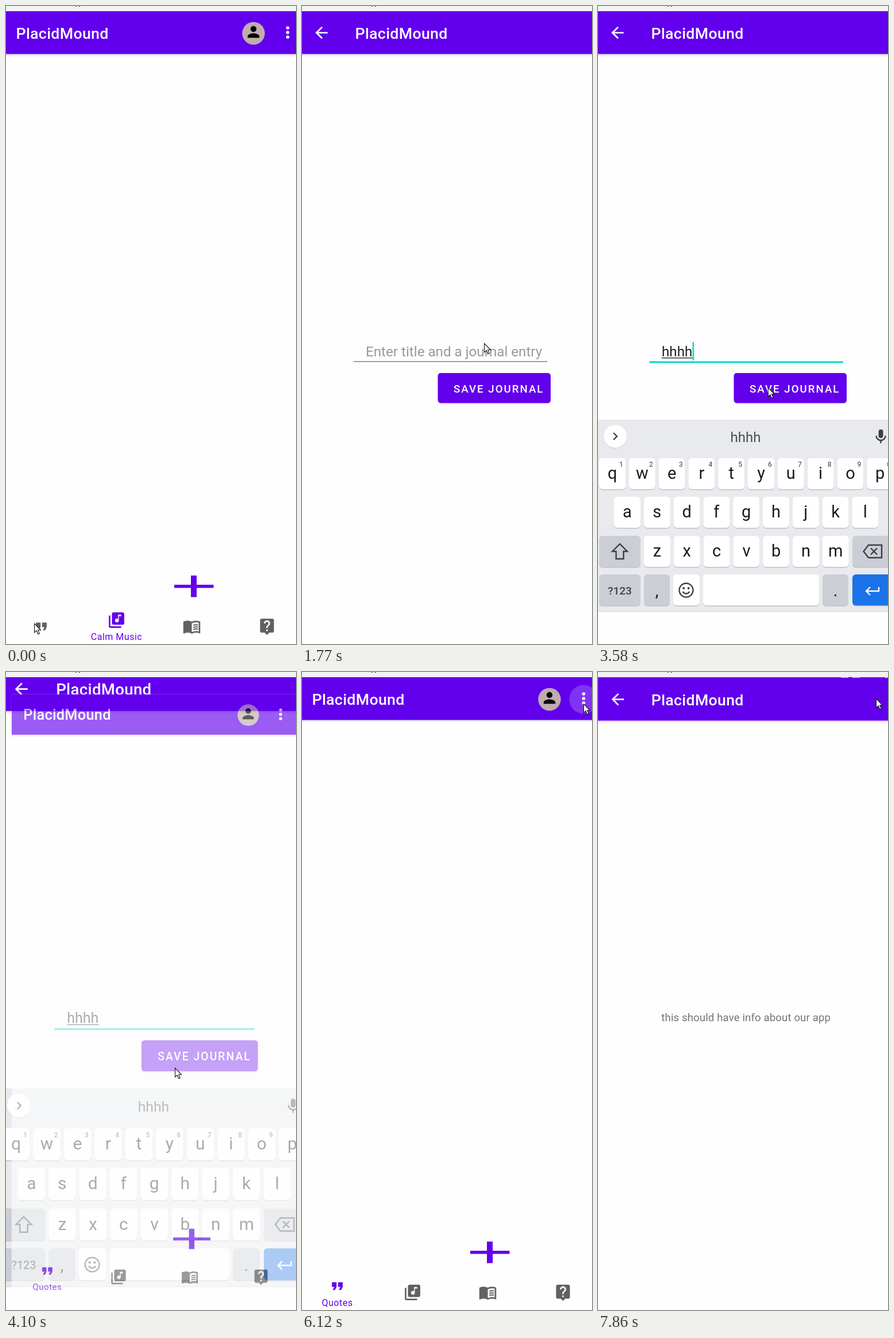
Recreate the animation shown at these times as an HTML page. Size 505 by 1109 pixels, loop 8 s.

```html
<!DOCTYPE html>
<html lang="en">
<head>
<meta charset="utf-8">
<title>Journal app</title>
<style>
  html, body { margin: 0; width: 100%; height: 100%; overflow: hidden; background: #fefefe; }
  svg { display: block; width: 505px; height: 1109px; font-family: Roboto, sans-serif; }
  .title { font-size: 26.7px; font-weight: 500; letter-spacing: .33px; fill: #fff; }
  .label { font-size: 16px; letter-spacing: .5px; text-anchor: middle; }
  .field { font-size: 24.2px; }
  .save { font-size: 18.7px; font-weight: 500; letter-spacing: 2px; fill: #fff; }
  .info { font-size: 18.7px; letter-spacing: .1px; fill: #757575; }
  .item { font-size: 21.3px; fill: #212121; }
  .key { font-size: 29px; text-anchor: middle; fill: #1b1b1d; }
  .digit { font-size: 12px; font-weight: 500; text-anchor: middle; fill: #5f6368; }
  .mode { font-size: 19px; font-weight: 500; text-anchor: middle; fill: #3c4043; }
  .hint { font-size: 24px; text-anchor: middle; fill: #4a4d51; }
  .line { fill: none; stroke: #3c4043; stroke-width: 2.4; }
</style>
</head>
<body>
<svg id="svg" viewBox="0 0 505 1109">
  <defs><clipPath id="phone"><rect y="9" width="505" height="1100"/></clipPath></defs>
  <rect width="505" height="1109" fill="#fefefe"/>
  <rect width="505" height="9" fill="#f4f2f5"/>
  <path d="M121 0h2M127 0h2" stroke="#222" stroke-width="2"/>
  <g clip-path="url(#phone)"><g id="stage">
    <g id="home"></g><g id="journal"></g><g id="about"></g>
  </g></g>
  <path id="cursor" d="M.5 .5V16l3.6-3.3 2.6 6 2.6-1.1-2.6-5.8h4.8z" fill="#fff" stroke="#111" stroke-width="1.1"/>
</svg>
<script>
const $ = id => document.getElementById(id);
const PURPLE = '#6200ee', TEAL = '#03dac5', APP = 'PlacidMound';

const text = (cls, x, y, s, more = '') => `<text class="${cls}" x="${x}" y="${y}" ${more}>${s}</text>`;
const rect = (x, y, w, h, fill, r = 0) =>
  `<rect x="${x}" y="${y}" width="${w}" height="${h}" rx="${r}" fill="${fill}"/>`;
// 24-unit icon centred on x, y
const icon = (d, x, y, fill, k = 1.34) =>
  `<path d="${d}" fill="${fill}" transform="translate(${x} ${y}) scale(${k}) translate(-12 -12)"/>`;

const ICONS = {
  quote: 'M6 17h3l2-4V7H5v6h3zm8 0h3l2-4V7h-6v6h3z',
  music: 'M20 2H8c-1.1 0-2 .9-2 2v12c0 1.1.9 2 2 2h12c1.1 0 2-.9 2-2V4c0-1.1-.9-2-2-2zm-2 5h-3v5.5c0 1.38-1.12 2.5-2.5 2.5S10 13.88 10 12.5s1.12-2.5 2.5-2.5c.57 0 1.08.19 1.5.51V5h4zM4 6H2v14c0 1.1.9 2 2 2h14v-2H4z',
  book: 'M21 5c-1.1-.35-2.3-.5-3.5-.5-1.95 0-4.05.4-5.5 1.5-1.45-1.1-3.55-1.5-5.5-1.5S2.45 4.9 1 6v14.65c0 .3.3.5.75.45C3.1 20.45 5.05 20 6.5 20c1.95 0 4.05.4 5.5 1.5 1.35-.85 3.8-1.5 5.5-1.5 1.65 0 3.35.3 4.75 1.05.4.1.75-.1.75-.45V6c-.6-.45-1.25-.75-2-1zm0 13.5c-1.1-.35-2.3-.5-3.5-.5-1.7 0-4.15.65-5.5 1.5V8c1.35-.85 3.8-1.5 5.5-1.5 1.2 0 2.4.15 3.5.5zM14 9.8q2.9-1.2 6-.5v1.5q-3.1-.7-6 .6zm0 2.7q2.9-1.2 6-.5v1.5q-3.1-.7-6 .6zm0 2.7q2.9-1.2 6-.5v1.5q-3.1-.7-6 .6z',
  help: 'M19 2H5c-1.1 0-2 .9-2 2v14c0 1.1.9 2 2 2h4l3 3 3-3h4c1.1 0 2-.9 2-2V4c0-1.1-.9-2-2-2zm-6 16h-2v-2h2zm2.07-7.75-.9.92C13.45 11.9 13 12.5 13 14h-2v-.5c0-1.1.45-2.1 1.17-2.83l1.24-1.26c.37-.36.59-.86.59-1.41 0-1.1-.9-2-2-2s-2 .9-2 2H8c0-2.21 1.79-4 4-4s4 1.79 4 4c0 .88-.36 1.68-.93 2.25z',
  person: 'M12 12c2.2 0 4-1.8 4-4s-1.8-4-4-4-4 1.8-4 4 1.8 4 4 4zm0 2c-2.67 0-8 1.34-8 4v2h16v-2c0-2.66-5.33-4-8-4z',
  back: 'M20 11H7.83l5.59-5.59L12 4l-8 8 8 8 1.41-1.41L7.83 13H20z'
};

const page = titleX => rect(-4, 9, 524, 1116, '#fefefe') +
  rect(-4, 84, 524, 1.5, '#dcdce0') + rect(-4, 85.5, 524, 2, '#f3f3f5') +
  rect(-4, 9, 524, 74.5, PURPLE) + text('title', titleX, 56.5, APP);
const subPage = () => page(92.5) + icon(ICONS.back, 34, 46.5, '#fff');

const TABS = [['quote', 'Quotes'], ['music', 'Calm Music'], ['book', ''], ['help', '']];
const tabX = i => 61.5 + 131 * i;

function homeMarkup() {
  const tabs = TABS.map(([name, label], i) =>
    `<g id="tab${i}">${icon(ICONS[name], tabX(i), 1078.5, 'inherit')}</g>` +
    text('label', tabX(i), 1102, label, `id="label${i}" fill="${PURPLE}"`)).join('');
  const dots = [38, 46, 54].map(y => `<circle cx="490.5" cy="${y}" r="2.8" fill="#fff"/>`).join('');
  return page(17.5) +
    '<circle cx="431" cy="47.5" r="19.7" fill="#bfadad"/>' + icon(ICONS.person, 431, 45, '#000', 1.28) +
    '<circle id="ripple" cx="490.5" cy="47.5" r="25" fill="#fff"/>' + dots +
    rect(293, 1006, 68.5, 5.5, PURPLE) + rect(322, 990, 10, 37.5, PURPLE) + tabs +
    '<g id="menu" style="filter:drop-shadow(0 2px 3px #0005)">' +
    rect(253, 14, 290, 150, '#fefefe', 4) + `<g id="press">${rect(253, 25, 290, 64, '#e7e7e7')}</g>` +
    text('item', 275, 66, 'About') + text('item', 275, 130, 'Logout') + '</g>';
}

function keyboardMarkup() {
  const PITCH = 51.8, GRAY = '#cbced5';
  const cap = (x, y, w = 46, fill = '#fff') => rect(x, y + 1.5, w, 54, '#bfc1c5', 6) + rect(x, y, w, 54, fill, 6);
  const row = (letters, x0, y) => [...letters].map((c, i) => {
    const x = x0 + PITCH * i;
    return cap(x, y) + text('key', x + 23, y + 36, c) +
      (y < 800 ? text('digit', x + 38.5, y + 15, (i + 1) % 10) : '');
  }).join('');
  return rect(-4, 719, 524, 334, '#e8eaed') + rect(-4, 1052, 524, 1.5, '#d4d6d9') +
    rect(-4, 1053.5, 524, 75, '#fefefe') +
    '<circle cx="30" cy="749" r="20" fill="#c9cbce"/><circle cx="30" cy="748" r="20" fill="#fff"/>' +
    '<path class="line" d="M27 742l6 6-6 6"/>' +
    '<rect x="488.500" y="736" width="8" height="15" rx="4" fill="#3c4043"/>' +
    '<path class="line" d="M484.500 747a8 8 0 0 0 16 0M492.500 755v5"/>' +
    '<g id="three"><path d="M181.500 732v33M333.500 732v33" stroke="#c3c5c9"/>' +
    text('hint', 113, 758, 'h') + text('hint', 257, 758, 'hi') + text('hint', 400, 758, 'he') + '</g>' +
    text('hint', 257, 758, '', 'id="one"') +
    row('qwertyuiop', 2, 786) + row('asdfghjkl', 28, 853) +
    cap(2, 921, 72, GRAY) + row('zxcvbnm', 80, 921) + cap(443, 921, 72, GRAY) +
    cap(2, 988, 72, GRAY) + cap(80, 988, 45, GRAY) + cap(131, 988) + cap(183, 988, 202) +
    cap(391, 988, 45, GRAY) + cap(443, 988, 72, '#1a73e8') +
    text('mode', 38, 1023, '?123') + text('key', 102.5, 1026, ',') + text('key', 413.5, 1026, '.') +
    '<path class="line" d="M38 935l-13 13h6.500v13h13v-13h6.500z"/>' +
    '<path class="line" d="M471 937h23v22h-23l-8.500-11zM475 942.500l11 11m0-11l-11 11"/>' +
    '<circle class="line" cx="153.500" cy="1015.500" r="12"/>' +
    '<circle cx="149.300" cy="1012" r="2" fill="#3c4043"/><circle cx="157.700" cy="1012" r="2" fill="#3c4043"/>' +
    '<path class="line" d="M147.500 1018q6 7 12 0"/>' +
    '<path class="line" style="stroke:#fff" d="M489 1010v7h-22m7-7l-7 7 7 7"/>';
}

$('home').innerHTML = homeMarkup();
$('journal').innerHTML = subPage() +
  text('field', 111, 609, '', 'id="entry"') +
  '<rect id="under" x="111" y="611" height="1.500" fill="#333"/>' +
  rect(137.5, 584, 2.5, 32, TEAL).replace('<rect', '<rect id="caret"') +
  '<rect id="rule" x="89.500" width="337.500"/>' +
  rect(237, 640, 196, 52, '#d9d6de', 5) + rect(236.5, 638, 196.5, 52, PURPLE, 5) +
  text('save', 264, 671.5, 'SAVE JOURNAL') + `<g id="keyboard">${keyboardMarkup()}</g>`;
$('about').innerHTML = subPage() + text('info', 110, 607, 'this should have info about our app');

const clamp = v => Math.min(1, Math.max(0, v));
const ramp = (t, from, to) => clamp((t - from) / (to - from));
const smooth = u => u * u * (3 - 2 * u);
const easeOut = u => 1 - (1 - u) ** 4.2;
const set = (id, attrs) => { for (const k in attrs) $(id).setAttribute(k, attrs[k]); };
const show = (id, on) => set(id, { opacity: +on });

// time, x, y of the pointer tip
const PATH = [
  [0, 49, 1073], [330, 49, 1073], [1080, 340, 1001], [1330, 340, 1001], [1770, 317, 586],
  [2100, 300, 602], [3330, 300, 602], [3720, 294, 688], [4110, 294, 688], [4490, 260, 794],
  [4700, 260, 794], [5720, 490, 60], [5840, 490, 55], [6480, 490, 55], [7050, 400, 55],
  [7480, 400, 55], [7860, 484, 46], [8000, 484, 46]
];
const SCREENS = [[0, 'home'], [1240, 'journal'], [4035, 'home'], [7670, 'about']];
const KEYS = [2690, 2815, 2960, 3100];

function pointer(t) {
  const i = PATH.findIndex(p => p[0] > t);
  const [t0, x0, y0] = PATH[i - 1], [t1, x1, y1] = PATH[i];
  const u = smooth(ramp(t, t0, t1));
  set('cursor', { transform: `translate(${x0 + (x1 - x0) * u} ${y0 + (y1 - y0) * u})` });
}

function place(id, scale, opacity) {
  set(id, { transform: `translate(258 567) scale(${scale}) translate(-258 -567)`, opacity });
}

// the new screen grows and fades in over the old one
function screens(t) {
  const n = SCREENS.findLastIndex(s => s[0] <= t);
  const [start, name] = SCREENS[n], old = n && SCREENS[n - 1][1];
  const u = n ? ramp(t, start, start + 300) : 1, p = easeOut(u);
  for (const id of ['home', 'journal', 'about']) place(id, 1, 0);
  if (old && u < 1) {
    place(old, 1 + .05 * p, 1);
    $('stage').append($(old));
  }
  place(name, .85 + .15 * p, n ? ramp(t, start + 33, start + 85) : 1);
  $('stage').append($(name));
}

function home(t) {
  const swap = smooth(ramp(t, 190, 320));
  TABS.forEach((_, i) => {
    const on = [swap, 1 - swap, 0, 0][i];
    set('tab' + i, { transform: `translate(0 ${-11 * on})`, fill: on > .5 ? PURPLE : '#616161' });
    show('label' + i, on);
  });
  set('ripple', { opacity: t < 6110 ? 0 : .2 * (1 - ramp(t, 6280, 6500)) });
  const open = easeOut(ramp(t, 6240, 6480));
  set('menu', {
    transform: `translate(505 14) scale(${.6 + .4 * open}) translate(-505 -14)`,
    opacity: open * (1 - ramp(t, 7480, 7600))
  });
  show('press', t >= 7170);
}

function journal(t) {
  const n = KEYS.filter(k => k <= t).length, focus = t >= 2320;
  const typed = 'h'.repeat(n);
  $('entry').textContent = typed || 'Enter title and a journal entry';
  set('entry', { fill: n ? '#212121' : '#999' });
  set('under', { width: 13.4 * (n == 2 ? 1 : n) });
  set('caret', { x: 111 + 13.4 * n });
  show('caret', focus && t < 3600);
  set('rule', { y: focus ? 617.5 : 617.3, height: focus ? 3 : 1.6, fill: focus ? TEAL : '#8a8a8a' });
  set('keyboard', { transform: `translate(0 ${410 * (1 - easeOut(ramp(t, 2390, 2680)))})` });
  show('three', n == 1 || n == 2);
  $('one').textContent = n > 2 ? typed : '';
}

function frame(now) {
  const t = now % 8000;
  screens(t);
  home(t);
  journal(t);
  pointer(t);
}
const begin = performance.now();
function loop() {
  frame(Math.max(0, performance.now() - begin));
  requestAnimationFrame(loop);
}
loop();
</script>
</body>
</html>
```
